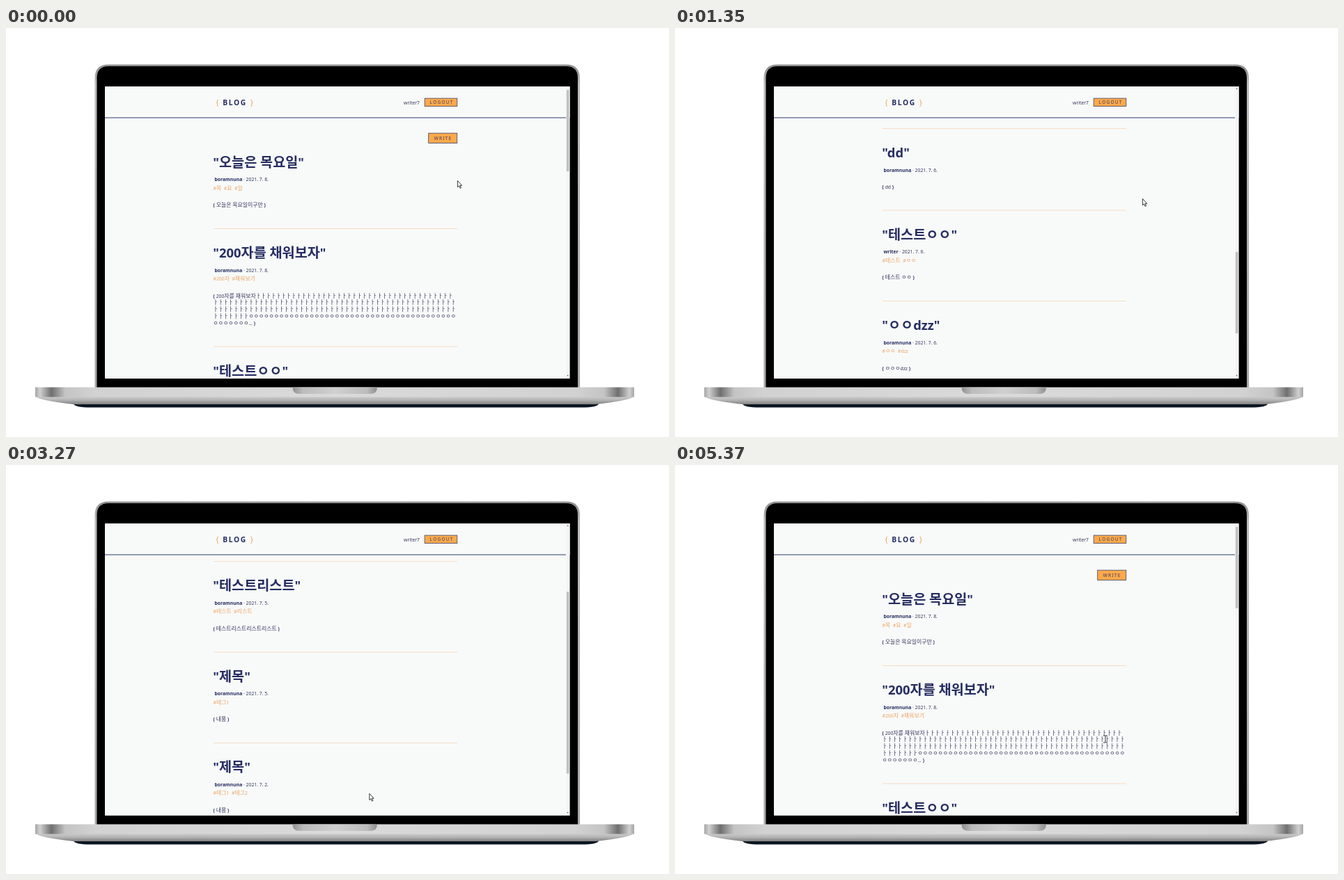
An HTML page for the animation above (5850 ms loop, 952x588 px).

```html
<!DOCTYPE html>
<html lang="ko">
<head>
<meta charset="utf-8">
<title>Blog</title>
<style>
  html, body { margin: 0; width: 100%; height: 100%; overflow: hidden; background: #fff; }
  svg { display: block; width: 952px; height: 588px; }
  text { font: 6.8px "Noto Sans", "Noto Sans CJK KR", "Open Sans", sans-serif; fill: #34375f; }
  .ko { font-family: "Noto Sans CJK KR", "Noto Sans CJK", sans-serif; font-size: 7.9px; }
  .title { font-size: 18.4px; font-weight: 700; fill: #262d62; }
  .title .ko { font-size: 19.67px; }
  .bold { font-weight: 700; fill: #262d62; }
  .tag { fill: #eda263; }
  .rule { stroke: #f6dcc4; stroke-width: 1; }
  .logo { font-size: 10.3px; font-weight: 600; letter-spacing: 1.65px; fill: #262d62; }
  .brace { font-size: 10.3px; fill: #f0a254; }
  .button rect { fill: #fba94c; stroke: #55526a; stroke-width: .9; }
  .button text { font-size: 6.4px; letter-spacing: 1.35px; fill: #3d3a5c; }
  .button.hover rect { fill: #f8faf9; }
</style>
</head>
<body>
<svg viewBox="0 0 952 588">
  <defs>
    <linearGradient id="lid" x2="0" y2="1">
      <stop offset="0" stop-color="#8d8d8d"/><stop offset=".06" stop-color="#b9b9b9"/>
      <stop offset="1" stop-color="#a6a6a6"/>
    </linearGradient>
    <linearGradient id="deck">
      <stop offset="0" stop-color="#a5a5a5"/><stop offset=".008" stop-color="#d0d0d0"/>
      <stop offset=".027" stop-color="#6f6f6f"/><stop offset=".05" stop-color="#c4c4c4"/>
      <stop offset=".1" stop-color="#d2d2d2"/><stop offset=".5" stop-color="#dadada"/>
      <stop offset=".9" stop-color="#d2d2d2"/><stop offset=".95" stop-color="#c4c4c4"/>
      <stop offset=".973" stop-color="#6f6f6f"/><stop offset=".992" stop-color="#d0d0d0"/>
      <stop offset="1" stop-color="#a5a5a5"/>
    </linearGradient>
    <linearGradient id="under" x2="0" y2="1">
      <stop offset="0" stop-color="#d0d0d0"/><stop offset=".5" stop-color="#b4b4b4"/>
      <stop offset="1" stop-color="#808080"/>
    </linearGradient>
    <linearGradient id="notch">
      <stop offset="0" stop-color="#8f8f8f"/><stop offset=".12" stop-color="#bcbcbc"/>
      <stop offset=".5" stop-color="#d0d0d0"/><stop offset=".88" stop-color="#bcbcbc"/>
      <stop offset="1" stop-color="#8f8f8f"/>
    </linearGradient>
    <clipPath id="screen"><path d="M142 84H809.5V504H142Z"/></clipPath>
  </defs>

  <path d="M127.5 517V72Q127.5 52.5 147 52.5H804.500Q824 52.500 824 72V517Z" fill="url(#lid)"/>
  <path d="M130.500 517V72Q130.500 55 147.500 55H804Q821 55 821 72V517Z"/>
  <path d="M97 540H851Q850 545.500 826 545.500H122Q98 545.500 97 540Z" fill="#0b1622"/>
  <path d="M42 529H902Q900 535 847 541H97Q44 535 42 529Z" fill="url(#under)"/>
  <path d="M42 516.500H902V530.500H42Z" fill="url(#deck)"/>
  <path d="M411.500 516.500H533Q533 526 523 526H421.500Q411.500 526 411.500 516.500Z" fill="url(#notch)"/>

  <g clip-path="url(#screen)">
    <path d="M142 84H810V504H142Z" fill="#f8faf9"/>
    <g id="content"></g>
    <path d="M142 84H810V129H142Z" fill="#f8faf9"/>
    <g id="head">
      <text class="brace" x="301.500" y="111.300">{</text>
      <text class="logo" x="311.200" y="111.300">BLOG</text>
      <text class="brace" x="351" y="111.300">}</text>
      <text x="594" y="109.800" text-anchor="end">writer7</text>
    </g>
    <path id="line" stroke="#2f3c6c" stroke-width="1"/>
    <g id="bar">
      <path d="M804.500 84H809.500V504H804.500Z" fill="#f3f4f4"/>
      <rect id="thumb" x="804.800" width="3.700" fill="#c1c1c1"/>
      <path id="up" d="M805.300 88L806.600 86.500L807.900 88Z" fill="#555"/>
      <path id="down" d="M805.300 499L806.600 500.500L807.900 499Z" fill="#555"/>
    </g>
    <g id="cursor">
      <path id="arrow" d="M.4 .5V9.800L2.500 7.900L4 11.400L5.500 10.700L4 7.400H6.700Z" fill="#fff" stroke="#222" stroke-width=".9"/>
      <path id="beam" d="M-3 -5H-.7L0 -4.500L.7 -5H3M0 -4.500V4.500M-3 5H-.7L0 4.500L.7 5H3" fill="none" stroke="#333"/>
    </g>
  </g>
</svg>
<script>
const LOOP = 5850, VIEW = 420, LEFT = 298, RIGHT = 648, FIRST = 193;
const AUTHOR = 'boramnuna';
const $ = id => document.getElementById(id);

// [title, date, tags, body lines, author]
const PAGES = [[
  ['오늘은 목요일', '7. 8.', '#목 #요 #일', ['오늘은 목요일이구만']],
  ['200자를 채워보자', '7. 8.', '#200자 #채워보기', [
    '200자를 채워보자' + 'ㅏ'.repeat(39), 'ㅏ'.repeat(48), 'ㅏ'.repeat(48),
    'ㅏ'.repeat(7) + 'ㅇ'.repeat(41), 'ㅇ'.repeat(7) + '...']],
  ['테스트ㅇㅇ', '7. 7.', '#테테테테스트 #ㅇㅇ #ㅇㅇㅇ', ['테스트ㅇㅇ']],
  ['zzzz', '7. 6.', '#sgdgds', ['dddfg']],
  ['dfdgeg', '7. 6.', '#gsdgd', ['egeghs']],
  ['zzz', '7. 6.', '#zzz', ['zzz']],
  ['dd', '7. 6.', '', ['dd']],
  ['테스트ㅇㅇ', '7. 6.', '#테스트 #ㅇㅇ', ['테스트 ㅇㅇ'], 'writer'],
  ['ㅇㅇdzz', '7. 6.', '#ㅇㅇ #dzz', ['ㅇㅇㅇdzz']],
  ['테스트', '7. 6.', '#테스트', ['테스트']],
], [
  ['테스트', '7. 5.', '#테스트', ['테스트']],
  ['테스트리스트', '7. 5.', '#테스트 #리스트', ['테스트리스트리스트리스트']],
  ['제목', '7. 5.', '#태그1', ['내용']],
  ['제목', '7. 2.', '#태그1 #태그2', ['내용']],
]];

const SCROLL = [[0, 0], [300, 0], [480, 196], [700, 385], [870, 402], [900, 409.3],
  [1350, 835.5], [1560, 1010], [1680, 1045.5], [2760, 1045.5], [2760, 0], [3060, 0],
  [3390, 235.5], [3540, 235.5], [3600, 236.5], [4740, 236.5], [4740, 0], [LOOP, 0]];

const POINTER = [[0, 648, 219], [30, 648, 219], [30, 657, 229], [300, 657, 229],
  [480, 671, 234], [900, 671, 242], [1350, 671, 245], [1680, 664, 270], [2070, 437, 479],
  [2130, 437, 479], [2160, 430, 482], [2430, 430, 482], [2580, 520, 477], [2940, 520, 477],
  [3390, 522, 470], [3540, 522, 470], [3810, 524, 440], [3960, 523, 480.2], [4260, 523, 480.2],
  [4530, 417, 477], [4920, 417, 477], [5010, 330, 400], [5120, 335, 220], [5230, 470, 157],
  [5320, 621, 250], [5370, 618, 394], [LOOP, 618, 394]];

const korean = s => s.replace(/[ㄱ-힣]+/g, '<tspan class="ko">$&</tspan>');
const text = (x, y, html, cls = '') => `<text class="${cls}" x="${x}" y="${y}">${html}</text>`;
const bold = s => `<tspan class="bold">${s}</tspan>`;

function button(label, x, y, w, h, pad) {
  return `<g class="button" data-box="${[x, y, w, h]}"><rect x="${x}" y="${y}" width="${w}" height="${h}"/>` +
    text(x + pad, y + h / 2 + 2.4, label) + '</g>';
}

function post([title, date, tags, lines, author = AUTHOR], y, last) {
  const bodyY = y + (tags ? 64 : 51);
  const end = lines.length - 1;
  const ruleY = bodyY + 31.5 + end * 9.75;
  return text(LEFT - .7, y + 6.7, korean(`"${title}"`), 'title') +
    text(LEFT + 1.5, y + 27, `${bold(author)} · 2021. ${date}`) +
    text(LEFT - .4, y + 39.6, korean(tags.replace(/ /g, '\u00a0\u00a0')), 'tag') +
    lines.map((s, i) => text(LEFT - .4, bodyY + i * 9.75,
      (i ? '' : bold('(\u00a0')) + korean(s) + (i < end ? '' : bold('\u00a0)')))).join('') +
    (last ? '' : `<path class="rule" d="M${LEFT} ${ruleY}H${RIGHT}"/>`);
}

function page(posts, n) {
  let y = FIRST, html = '';
  posts.forEach((p, i) => {
    const last = i === posts.length - 1;
    html += post(p, y, last);
    if (!last) y += (p[2] ? 130.5 : 117.5) + (p[3].length - 1) * 9.75;
  });
  html += button('PRE', 400.3, y + 117.5, 30.5, 14.5, 7.6) + text(468.3, y + 125.5, n + 1) +
    button('NEXT', 510.3, y + 117.5, 35.5, 14.5, 7.6);
  return { html, max: y - 348 };
}

function at(track, t) {
  let i = track.length - 2;
  while (i > 0 && track[i][0] > t) i--;
  const [a, b] = [track[i], track[i + 1]];
  const k = (t - a[0]) / (b[0] - a[0]);
  return a.slice(1).map((v, j) => v + (b[j + 1] - v) * k);
}

const built = PAGES.map(page);
$('content').innerHTML = button('WRITE', 606.7, 151.2, 41, 14.3, 8) +
  built.map(p => `<g>${p.html}</g>`).join('');
$('head').insertAdjacentHTML('beforeend', button('LOGOUT', 601.2, 101.1, 46.6, 11.4, 7.4));
const groups = [...$('content').children].slice(1);
const pagers = groups.map(g => [...g.querySelectorAll('.button')]
  .map(el => ({ el, box: el.dataset.box.split(',').map(Number) })));

const show = (el, on) => { el.style.display = on ? '' : 'none'; };

function draw(t) {
  const blank = t >= 2760 && t < 2940;
  const current = t >= 2760 && t < 4740 ? 1 : 0;
  const [scroll] = at(SCROLL, t);
  const [x, y] = at(POINTER, t);
  const shift = blank ? 2.2 : 0;

  $('content').setAttribute('transform', `translate(${shift} ${-scroll})`);
  $('head').setAttribute('transform', `translate(${shift} 0)`);
  $('line').setAttribute('d', `M142 129H${blank ? 809 : 804}`);
  groups.forEach((g, i) => show(g, !blank && i === current));
  pagers[current].forEach(({ el, box: [bx, by, w, h] }) => {
    const dy = y + scroll - by;
    el.classList.toggle('hover', x > bx && x < bx + w && dy > 0 && dy < h);
  });

  const { max } = built[current];
  const size = 408.5 * VIEW / (VIEW + max);
  show($('bar'), !blank);
  $('thumb').setAttribute('height', size);
  $('thumb').setAttribute('y', 89 + scroll / max * (408.5 - size));
  show($('up'), scroll > 0);
  show($('down'), scroll < max);

  const overText = t >= 5340;
  $('cursor').setAttribute('transform', `translate(${x} ${y})`);
  show($('arrow'), !overText);
  show($('beam'), overText);
}

let start;
function tick(now) {
  start ??= now;
  draw((now - start) % LOOP);
  requestAnimationFrame(tick);
}
draw(0);
requestAnimationFrame(tick);
</script>
</body>
</html>
```
